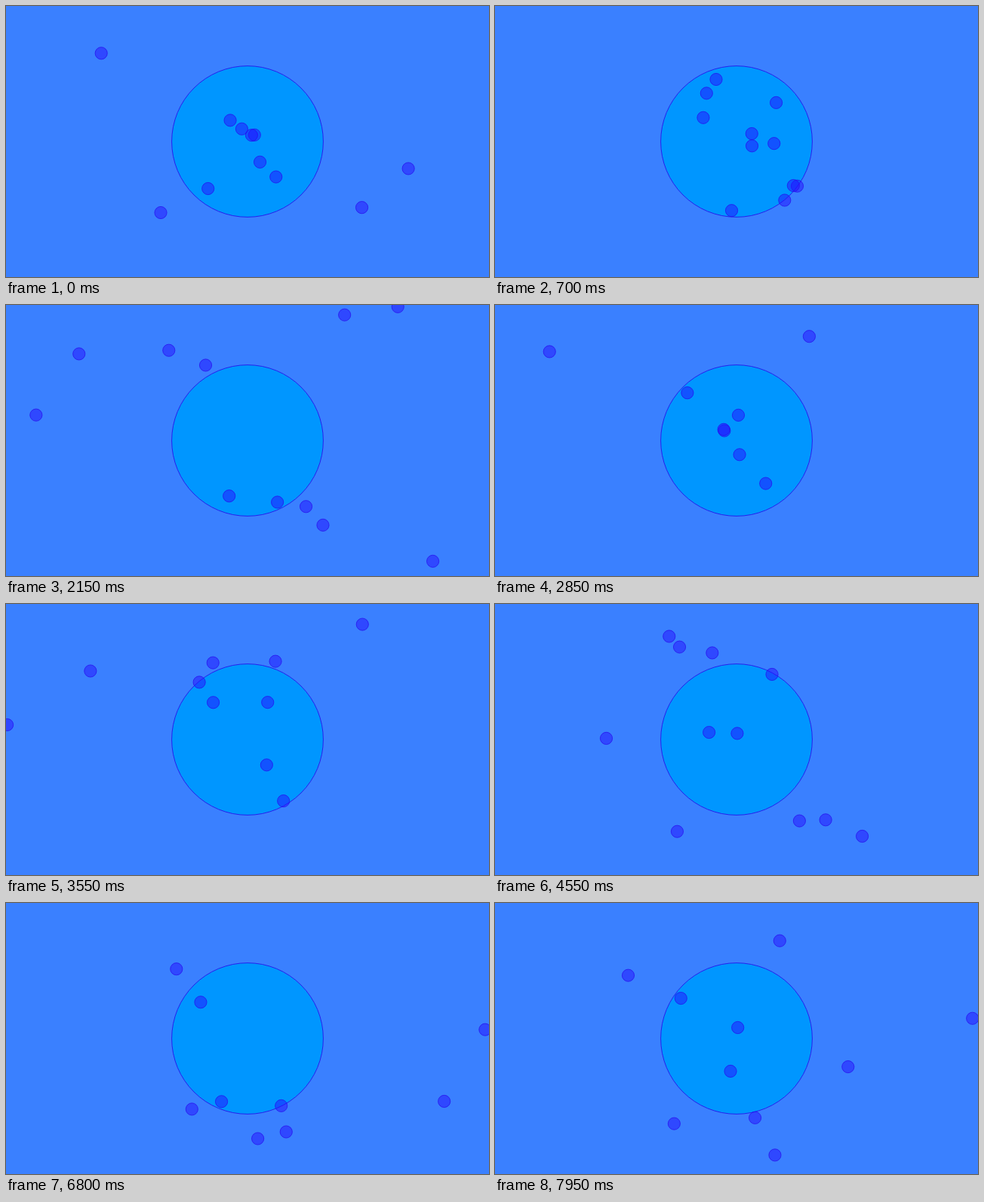
Animation of 640 by 360 pixels, one loop 8 s. Source, as an HTML page with a canvas:

```html
<!DOCTYPE html>
<html lang="en">
<head>
<meta charset="utf-8">
<title>Orbs falling through a disc</title>
<style>
  html, body { margin: 0; width: 100%; height: 100%; overflow: hidden; background: #3a80ff; }
  canvas { display: block; }
</style>
</head>
<body>
<canvas id="stage" width="640" height="360"></canvas>
<script>
const CX = 320, CY = 180;
const LOOP = 8000, FRAME = 50;
const PULL = 144;      // px/s², constant size, always toward the centre
const SIDESTEP = 0.7;  // how far a drifting orb misses the centre

// Each orb swings through the centre along a slowly turning line:
// line angle (deg), turn (deg/s), first pass of the centre (s), time between passes (s)
const orb = (angle, turn, first, swing) => ({ angle, turn, first, swing });
const ORBS = [
  orb(190.5, -1.9, 0.865, 4.335),
  orb(211.1, -1.95, 0.775, 3.912),
  orb(-46.6, -2.65, 0.37, 3.424),
  orb(-38.1, -1.8, 0.62, 3.953),
  orb(236.6, -3.3, 0.305, 3.04),
  orb(251.5, -4.1, 0.165, 2.785),
  orb(93.4, 5, 0.05, 2.612),
  orb(49.9, 5.05, 0.015, 2.726),
  orb(36.1, 4.8, 0.08, 2.855),
  orb(38.4, 4.15, 0.172, 3.034),
  orb(30.5, 1.4, 0.875, 4.47)
];

// Between passes the distance is a parabola; every pass flips the side.
function place({ angle, turn, first, swing }, t) {
  const pass = Math.floor((t - first) / swing);
  const since = t - first - pass * swing;
  const side = pass % 2 ? -1 : 1;
  const along = side * PULL / 2 * since * (swing - since);
  const across = -side * SIDESTEP * turn * (swing - 2 * since);
  const a = (angle + turn * t) * Math.PI / 180;
  const c = Math.cos(a), s = Math.sin(a);
  return [CX + along * c - across * s, CY + along * s + across * c];
}

const ctx = document.getElementById("stage").getContext("2d");

function disc(x, y, r, fill, stroke) {
  ctx.beginPath();
  ctx.arc(x, y, r, 0, Math.PI * 2);
  ctx.fillStyle = fill;
  ctx.fill();
  ctx.strokeStyle = stroke;
  ctx.stroke();
}

function draw(t) {
  ctx.fillStyle = "#3a80ff";
  ctx.fillRect(0, 0, 640, 360);
  disc(CX, CY, 100.4, "#0096ff", "rgba(40, 20, 235, 0.9)");
  for (const o of ORBS) {
    const [x, y] = place(o, t);
    disc(x, y, 8.1, "rgba(36, 16, 255, 0.5)", "rgba(40, 10, 235, 0.7)");
  }
}

const t0 = performance.now();
function tick() {
  const ms = (performance.now() - t0) % LOOP;
  draw(Math.floor(ms / FRAME) * FRAME / 1000);
  requestAnimationFrame(tick);
}
tick();
</script>
</body>
</html>
```
